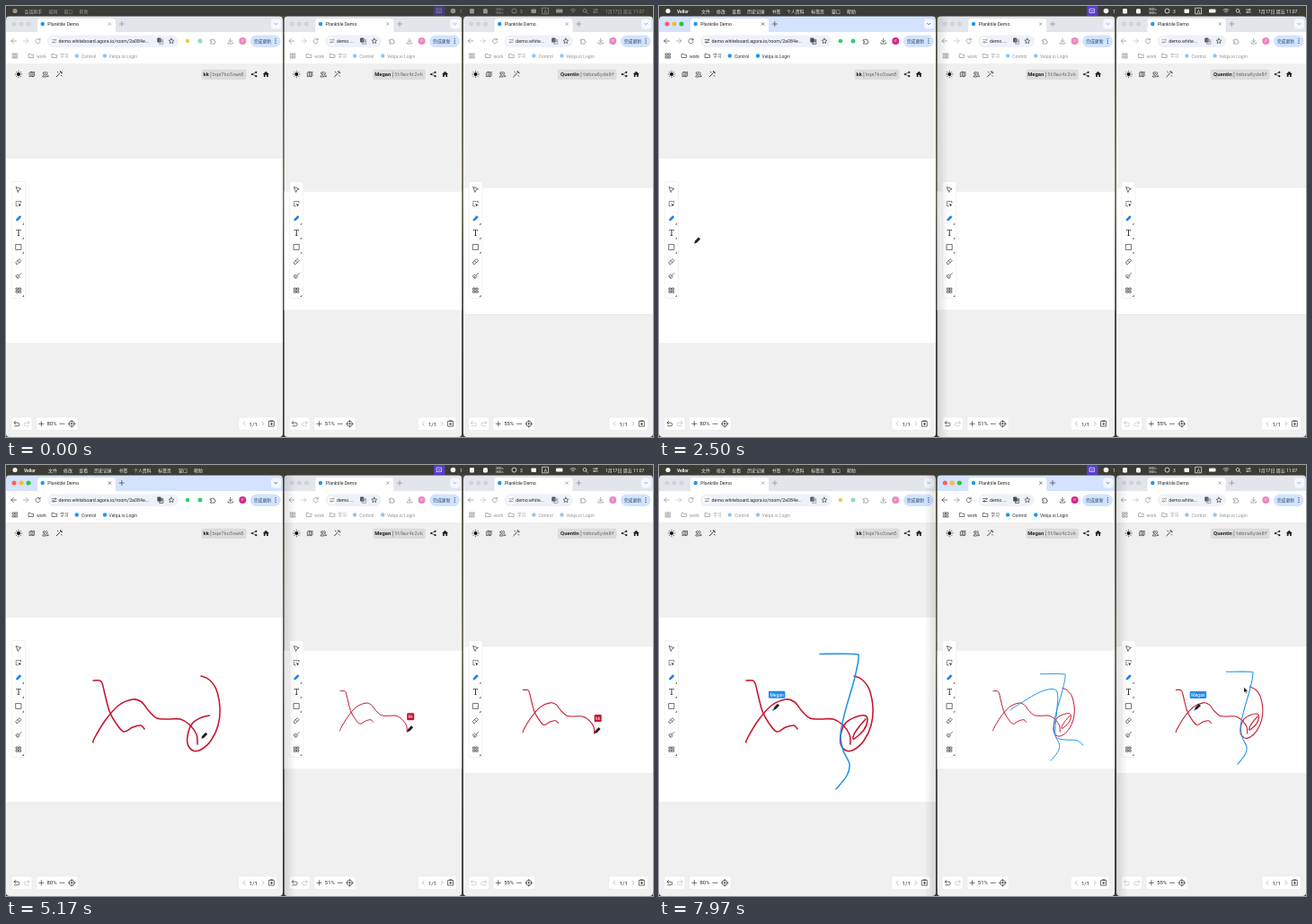
Recreate the animation shown at these times as an HTML page. Size 720 by 480 pixels, loop 8000 ms.

```html
<!DOCTYPE html>
<html lang="zh">
<head>
<meta charset="utf-8">
<title>Shared whiteboard</title>
<style>
html, body { margin: 0; width: 100%; height: 100%; overflow: hidden; background: #222; }
svg { display: block; width: 100vw; height: 100vh; }
text { font-family: Roboto, "Noto Sans CJK SC", "Noto Sans CJK", sans-serif; dominant-baseline: central; white-space: pre; }
.win { --strip: #e2e5ea; --ink: #8d8f92; --text: #929497; --mark: #8cc8f7; --ext1: #efc94c; --ext2: #8fd5d0; --face: #ec86bf; }
.win.on { --strip: #d3e3fd; --ink: #3c4043; --text: #333; --mark: #1e96f5; --ext1: #2fd05b; --ext2: #37c978; --face: #d6278c; }
.strip { fill: var(--strip); }
.bar path { stroke: var(--ink); }
.bar text { fill: var(--text); }
.bar .dark { fill: #2a2a2a; }
.icon { fill: none; stroke: #333; stroke-width: .7; stroke-linecap: round; stroke-linejoin: round; }
.solid { fill: #222; }
.panel { fill: #fff; stroke: #e4e4e6; stroke-width: .5; }
.ink { fill: none; stroke-width: 1.55; stroke-linecap: round; stroke-linejoin: round; stroke-dasharray: 1 2; }
.mono { font-family: "Noto Sans Mono", "DejaVu Sans Mono", monospace; }
.serif { font-family: "Noto Serif", "Liberation Serif", serif; }
</style>
</head>
<body>
<svg id="stage" viewBox="0 0 720 480" preserveAspectRatio="none"></svg>
<script>
const LOOP = 8000, INK_DELAY = 100, REMOTE_DELAY = 740, FOCUS = [2300, 6100];
const RED = '#c5142d', BLUE = '#1f93ea', SHADE = 14;
const stage = document.getElementById('stage');

const text = (x, y, s, size = 5, attrs = '') => `<text x="${x}" y="${y}" font-size="${size}" ${attrs}>${s}</text>`;
const icon = (x, y, d, attrs = '') => `<path class="icon" transform="translate(${x} ${y})" d="${d}" ${attrs}/>`;
const solid = (x, y, d, attrs = '') => `<path class="solid" transform="translate(${x} ${y})" d="${d}" ${attrs}/>`;
const dot = (x, y, r, fill, attrs = '') => `<circle cx="${x}" cy="${y}" r="${r}" fill="${fill}" ${attrs}/>`;
const box = (x, y, w, h, r, attrs) => `<rect x="${x}" y="${y}" width="${w}" height="${h}" rx="${r}" ${attrs}/>`;

const SHAPES = {
  back: 'M2.8 0H-2.8M-.2-2.6L-2.8 0L-.2 2.6',
  next: 'M-2.8 0H2.8M.2-2.6L2.8 0L.2 2.6',
  reload: 'M2-1.7A2.6 2.6 0 1 0 2.6.6M2.5-2.9V-1.2H.8',
  tune: 'M-2.5-1.4H0M-2.5 1.4H-1.7M.2 1.4H2.5M2.4-1.4A.9.9 0 1 0 .6-1.4A.9.9 0 1 0 2.4-1.4M.2 1.4A.9.9 0 1 0-1.7 1.4A.9.9 0 1 0 .2 1.4',
  star: 'M0-2.9L.9-1 2.9-.8 1.4.5 1.8 2.6 0 1.5-1.8 2.6-1.4.5-2.9-.8-.9-1Z',
  puzzle: 'M-2.5-1.6H-.9A.9.9 0 1 1 .9-1.6H2V0A.9.9 0 1 1 2 1.7V2.8H-2.5V1.7A1 1 0 1 0-2.5-.2Z',
  download: 'M0-3V1M-1.9-.8L0 1.1 1.9-.8M-2.7 1.4V2.8H2.7V1.4',
  apps: 'M-2.6-2.6H-.6V-.6H-2.6ZM.6-2.6H2.6V-.6H.6ZM-2.6.6H-.6V2.6H-2.6ZM.6.6H2.6V2.6H.6Z',
  folder: 'M-2.6-2H-.6L.2-1.2H2.6V2H-2.6Z',
  map: 'M-2.6-2L-.9-2.7.9-2 2.6-2.7V2L.9 2.7-.9 2-2.6 2.7ZM-.9-2.7V2M.9-2V2.7',
  sun: 'M0-3.8V-2.9M0 2.9V3.8M-3.8 0H-2.9M2.9 0H3.8M-2.7-2.7L-2.1-2.1M2.1 2.1L2.7 2.7M-2.7 2.7L-2.1 2.1M2.1-2.1L2.7-2.7',
  people: 'M-3.2 2.6C-3.2.2.4.2.4 2.6ZM1 .7C2.4.5 3.2 1.3 3.2 2.6H1.4M-2.7-1.2A1.3 1.3 0 1 0-.1-1.2A1.3 1.3 0 1 0-2.7-1.2M.8-2.4A1.2 1.2 0 1 1 1.2 0',
  wand: 'M-2.8 2.8L1-1M1.6-3.4V-2.4M2.6-1.4H3.6M-1.8-2.8L-1-2M2.4-2.4L3-3M2.4 1.4L3 2',
  share: 'M2.3-2.2L-2.2 0 2.3 2.2',
  home: 'M-3.5 0L0-3.3 3.5 0H2.5V3H.8V.8H-.8V3H-2.5V0Z',
  pointer: 'M-2.6-2.6L2.8-.7.6.4-.5 2.8Z',
  select: 'M-1 2.6H-2.8V-2.8H2.6V-1',
  pencil: 'M-3 3.2L-2.5.9 1.2-3.1 3.2-1.3-.6 2.6Z',
  square: 'M-2.9-2.9H2.9V2.9H-2.9Z',
  eraser: 'M-2.9.9L.9-2.9 2.9-.9-.9 2.9H-2ZM-1.1-.9L.9 1.1',
  broom: 'M3-3.1L.5-.6M-.8-1.2L1.1.7-.7 3-3 .4ZM-1.7 1.9L-.9.7',
  undo: 'M-1.3-2.8L-3-1.2-1.3.4M-3-1.2H1A1.8 1.8 0 0 1 1 2.5H-2.4',
  redo: 'M1.3-2.8L3-1.2 1.3.4M3-1.2H-1A1.8 1.8 0 0 0-1 2.5H2.4',
  plus: 'M-2.6 0H2.6M0-2.6V2.6',
  minus: 'M-2.6 0H2.6',
  target: 'M3 0A3 3 0 1 0-3 0A3 3 0 1 0 3 0M0-3.8V-2M0 2V3.8M-3.8 0H-2M2 0H3.8',
  left: 'M1-2L-1 0 1 2',
  right: 'M-1-2L1 0-1 2',
  addPage: 'M-2.8-2.8H2.8V2.8H-2.8ZM0-1.2V1.4M-1.2 .2H1.2M-1.4-3.5H1.4',
  close: 'M-1.3-1.3L1.3 1.3M1.3-1.3L-1.3 1.3',
  chevron: 'M-1.6-.8L0 .8 1.6-.8',
};

// Boards are described in the first window's coordinates and scaled into the others.
const BOARD_TOP = 169.5, BOARD_H = 206, WINDOW_TOP = 11.2;
const WINDOWS = [
  { x: 0, right: 308, off: 0, scale: 1, top: 169.5, name: 'kk', id: 'bqe7ko3xwm5', label: 90.5, url: 'demo.whiteboard.agora.io/room/2a084e...', star: 124, zoom: '80%' },
  { x: 309.5, right: 507.3, off: 309.3, scale: .641, top: 206.5, name: 'Megan', id: '5t9wz4r2vk', label: 98.8, url: 'demo....', star: 97.5, zoom: '51%' },
  { x: 509, right: 720, off: 508.6, scale: .684, top: 202.3, name: 'Quentin', id: 'tmbrw6yde8f', label: 106, url: 'demo.white...', star: 97, zoom: '55%' },
];
const boardX = w => w.off + .4 * (w.off > 0);
const toWindow = (w, p) => ({ x: boardX(w) + w.scale * p.x, y: w.top + w.scale * (p.y - BOARD_TOP) });

const STROKES = [
  { owner: 0, start: 3200, dur: 600, pts: [97,240, 104,240, 107,243, 110,255, 115,274, 122,287, 131,297, 141,292, 150,290, 154,294] },
  { owner: 0, start: 3950, dur: 480, pts: [97,309, 98,305, 110,285, 125,268, 141,261, 151,264, 159,274, 168,282, 180,283, 194,283, 204,289, 212,300, 213,311] },
  { owner: 0, start: 4610, dur: 640, pts: [217,235, 226,239, 234,250, 238,270, 236,290, 228,307, 217,317, 208,318, 202,310, 203,297, 208,287, 218,281, 229,279, 232,284, 228,295, 217,305, 217,300, 223,291, 230,283] },
  { owner: 1, start: 6495, dur: 500, pts: [179,210.5, 217,210.5, 222,215, 217,240, 207,275, 202,300, 205,318, 212,333, 209,346, 197,361] },
  { owner: 1, start: 7230, dur: 420, pts: [126.7,273, 148,259, 180,241, 203,237, 209,247, 208,269, 205,300, 205,317, 211,323, 226,325, 243,326, 253,334] },
];

function smoothPath(flat) {
  const p = [];
  for (let i = 0; i < flat.length; i += 2) p.push([flat[i], flat[i + 1]]);
  const at = i => p[Math.max(0, Math.min(p.length - 1, i))];
  let d = `M${p[0]}`;
  for (let i = 0; i < p.length - 1; i++) {
    const [a, b, c, e] = [at(i - 1), at(i), at(i + 1), at(i + 2)];
    const c1 = b.map((v, k) => v + (c[k] - a[k]) / 6), c2 = c.map((v, k) => v - (e[k] - b[k]) / 6);
    d += `C${c1} ${c2} ${c}`;
  }
  return d;
}

function browserBar(w, i) {
  const { off: o, right: r } = w, pill = r - w.star + 8;
  let s = box(w.x, WINDOW_TOP, r - w.x, 22, 4, 'class="strip"') + box(w.x, 29, r - w.x, 35, 0, 'fill="#fff"');
  s += box(o + 35, 14, 87, 18, 3.5, 'fill="#fff"');
  ['#ff5f57', '#febc2e', '#28c840'].forEach((c, k) => {
    s += dot(o + 9 + k * 8, 20, 2.5, '#d2d3d6') + dot(o + 9 + k * 8, 20, 2.5, c, 'data-light');
  });
  s += dot(o + 40.7, 20, 2.2, '#1e96f5') + text(o + 46.3, 20, 'Planktile Demo', 5.2, 'class="dark"');
  s += icon(o + 115.5, 20, SHAPES.close) + icon(o + 128.8, 20, SHAPES.plus, 'stroke-width=".6"');
  s += box(r - 13, 14.5, 11, 11, 3, 'fill="#f3f7ff"') + icon(r - 7.8, 20, SHAPES.chevron);
  s += icon(o + 8.5, 39, SHAPES.back) + icon(o + 22, 39, SHAPES.next, 'opacity=".55"') + icon(o + 35.5, 39, SHAPES.reload);
  s += box(o + 46, 32.5, pill - o - 46, 13.5, 6.7, 'fill="#edf1fa"');
  s += dot(o + 53.5, 39, 4.6, '#fff') + icon(o + 53.5, 39, SHAPES.tune) + text(o + 58.6, 39.2, w.url, 5.3, 'class="dark"');
  const tr = r - w.star - 12.5;
  s += box(tr - 3.2, 35.5, 4.2, 5, .5, 'fill="#555"') + icon(tr + 1, 39.8, 'M-1.4-2.4H2.3V2.6H-1.4ZM-.6-.8H1.5M.4-1.4V-.8M-.4 1.4L1.3-.6');
  s += icon(r - w.star, 39, SHAPES.star, 'style="stroke:#444"');
  if (!i) s += dot(202, 39, 2.3, 'var(--ext1)') + dot(216, 39, 2.5, 'var(--ext2)');
  s += icon(r - 78, 39.3, SHAPES.puzzle) + icon(r - 58.3, 39.2, SHAPES.download);
  s += dot(r - 44.7, 39, 4, 'var(--face)') + text(r - 44.7, 39, 'LY', 2.8, 'text-anchor="middle" style="fill:#fff"');
  s += box(r - 36, 32.5, 33.5, 13.5, 6.7, 'fill="#d3e3fd"') + text(r - 32.3, 39, '完成更新', 4.9, 'style="fill:#24446f"');
  s += [-2.4, 0, 2.4].map(dy => dot(r - 8, 39 + dy, .65, '#24446f')).join('');
  s += icon(o + 10, 55.5, SHAPES.apps) + icon(o + 28, 55.5, SHAPES.folder) + text(o + 34, 55.6, 'work');
  s += icon(o + 54, 55.5, SHAPES.folder) + text(o + 60.3, 55.6, '学习', 4.6);
  s += dot(o + 78.8, 55.5, 2.2, 'var(--mark)') + text(o + 84, 55.6, 'Control');
  s += dot(o + 110, 55.5, 2.2, 'var(--mark)') + text(o + 114.6, 55.6, 'Velqa.io Login');
  return `<g class="bar">${s}</g>`;
}

function page(w) {
  const { off: o, right: r } = w, h = BOARD_H * w.scale, width = r - w.x;
  let s = box(w.x, 63.5, width, 417, 0, 'fill="#f0f0f0"');
  s += box(w.x, w.top - .5, width, h + 1, 0, 'fill="#e6e6e6"') + box(w.x, w.top, width, h, 0, 'fill="#fff"');
  s += `<g transform="translate(${boardX(w)} ${w.top - BOARD_TOP * w.scale}) scale(${w.scale})">` + STROKES.map(k =>
    `<path class="ink" pathLength="1" stroke="${k.owner ? BLUE : RED}" d="${smoothPath(k.pts)}"/>`).join('') + '</g>';

  s += dot(o + 14, 76, 2, '#111') + icon(o + 14, 76, SHAPES.sun) + icon(o + 29, 76, SHAPES.map);
  s += icon(o + 44, 76, SHAPES.people) + icon(o + 59, 76, SHAPES.wand, 'style="stroke-width:.95"');
  const idWidth = w.id.length * 3.2, idX = r - 43 - idWidth;
  s += box(r - w.label, 70.8, w.label - 40.5, 11.2, 2, 'fill="#dcdcdd"');
  s += text(idX - 4, 76.4, w.name, 5.9, 'font-weight="700" text-anchor="end" fill="#222"');
  s += icon(idX - 1.9, 76.4, 'M0-2.8V2.8', 'style="stroke-width:.4"');
  s += text(idX, 76.4, w.id, 5.3, 'class="mono" fill="#666"');
  s += icon(r - 32, 76, SHAPES.share) + [[2.3, -2.2], [-2.2, 0], [2.3, 2.2]].map(([x, y]) => dot(r - 32 + x, 76 + y, 1.1, '#222')).join('');
  s += solid(r - 18.7, 76, SHAPES.home);

  const tx = o + 14, ty = k => 204.3 + 16.05 * k;
  s += box(o + 6.3, 195.5, 15.2, 130, 1.8, 'class="panel"');
  s += icon(tx, ty(0), SHAPES.pointer) + icon(tx, ty(1), SHAPES.select, 'stroke-dasharray="1 1.3"') + solid(tx + 1, ty(1) + 1, 'M-1.2-1.2L2.2.1.6.7 0 2.2Z');
  s += solid(tx, ty(2), SHAPES.pencil, 'style="fill:#1f80ee"') + text(tx, ty(3), 'T', 9, 'class="serif" text-anchor="middle" fill="#222"');
  s += icon(tx, ty(4), SHAPES.square) + icon(tx, ty(5), SHAPES.eraser) + icon(tx, ty(6), SHAPES.broom) + icon(tx, ty(7), SHAPES.apps);
  s += [2, 3, 4, 7].map(k => solid(tx + 5, ty(k) + 6.2, 'M.9-.9V.9H-.9Z')).join('');

  const y = 465.3;
  s += box(o + 6, 458, 23, 14.5, 2, 'class="panel"') + icon(o + 12, y, SHAPES.undo, o > 309 && o > 400 ? 'opacity=".3"' : '') + icon(o + 23, y, SHAPES.redo, 'opacity=".3"');
  s += box(o + 33.5, 458, 46.5, 14.5, 2, 'class="panel"') + icon(o + 39.3, y, SHAPES.plus) + text(o + 51, y, w.zoom, 5.9, 'text-anchor="middle" fill="#222"');
  s += icon(o + 62.5, y, SHAPES.minus) + icon(o + 73.2, y, SHAPES.target) + dot(o + 73.2, y, 1, '#333');
  s += box(r - 49, 458, 43, 14.5, 2, 'class="panel"') + icon(r - 43, y, SHAPES.left, 'opacity=".45"') + text(r - 32.8, y, '1/1', 6, 'text-anchor="middle" fill="#222"');
  return s + icon(r - 22, y, SHAPES.right, 'opacity=".45"') + icon(r - 12.5, y, SHAPES.addPage);
}

function menuBar() {
  const items = list => list.map(([x, s], i) => text(x, 5.5, s, 4.9, i ? '' : 'font-weight="700"')).join('');
  const idle = items([[20.5, '会话助手'], [47.5, '编辑'], [64.5, '窗口'], [81.5, '帮助']]);
  const busy = items([[20, 'Vellor'], [47, '文件'], [64, '修改'], [81.3, '查看'], [98.2, '历史记录'], [125.6, '书签'], [142, '个人资料'], [169.3, '标签页'], [192, '窗口'], [209, '帮助']]);
  const line = 'style="stroke:#fff"';
  const status = box(476, 0, 12.5, 11, 1.5, 'fill="#5a3fd0"') + icon(482, 5.5, 'M-2.6-2.4H2.6V2H-2.6ZM-1 0H1', line)
    + dot(497.5, 5.5, 2.8, '#fff') + text(505, 5.5, '1') + box(516, 3, 5, 5.5, 1, '') + box(531, 3, 5, 5.5, 1.6, '')
    + text(545, 3.7, '0KB/s', 3.2) + text(545, 7.5, '0KB/s', 3.2) + dot(565.5, 5.5, 2.5, 'none', 'stroke="#fff" stroke-width=".8"') + text(572, 5.5, '3')
    + box(584.5, 3.4, 5.5, 4.5, .8, '') + icon(600.3, 5.5, 'M-3.3-3.3H3.3V3.3H-3.3Z', line) + text(600.3, 5.6, 'A', 5, 'text-anchor="middle"')
    + box(612, 3.5, 7.5, 4, 1, '') + icon(631, 5.5, 'M-3-1A4.3 4.3 0 0 1 3-1M-1.7.5A2.4 2.4 0 0 1 1.7.5M0 2V2.1', line)
    + icon(644.5, 5.3, 'M1.5 0A1.9 1.9 0 1 0-2.3 0A1.9 1.9 0 1 0 1.5 0M1 1.4L2.7 3', line)
    + icon(656, 5.5, 'M-2.5-1.4H2.5M-2.5 1.4H2.5M1-2.2V-.6M-1 .6V2.2', line) + text(667, 5.5, '1月17日 周五 11:07', 5);
  return box(0, 0, 720, WINDOW_TOP, 0, 'fill="#3b3c35"')
    + `<g id="menu" fill="#fff">${dot(10, 5.5, 2.6, '#fff')}<g id="idle">${idle}</g><g id="busy">${busy}</g>${status}</g>`;
}

const PEN = 'M0 0L.8-2.8 4.8-7 7-5 2.9-.8Z';
const remotePen = (i, owner) => {
  const name = WINDOWS[owner].name, w = owner ? 18.5 : 8;
  return `<g data-remote="${i},${owner}">${solid(0, 0, PEN)}${box(4 - w / 2, -21, w, 8, 1.2, `fill="${owner ? '#258ce8' : RED}"`)}`
    + text(4, -17, name, 5, 'text-anchor="middle" fill="#fff"') + '</g>';
};

const gradient = (id, axis, stops) => `<linearGradient id="${id}" ${axis}>${stops.map(([at, color, alpha = 1]) =>
  `<stop offset="${at}" stop-color="${color}" stop-opacity="${alpha}"/>`).join('')}</linearGradient>`;

stage.innerHTML = '<defs>'
  + gradient('desk', 'x2="0" y2="1"', [[0, '#4a4b3f'], [.4, '#75705f'], [.6, '#45483f'], [1, '#3a3d38']])
  + gradient('shadeLeft', '', [[0, '#000', 0], [1, '#000', .13]]) + gradient('shadeRight', '', [[0, '#000', .13], [1, '#000', 0]]) + '</defs>'
  + box(0, 0, 720, 480, 0, 'fill="url(#desk)"')
  + WINDOWS.map((w, i) => `<clipPath id="clip${i}">${box(w.x, WINDOW_TOP, w.right - w.x, 480 - WINDOW_TOP, 4, '')}</clipPath><g class="win" clip-path="url(#clip${i})">${page(w)}${browserBar(w, i)}</g>`).join('')
  + ['Left', 'Right'].map(side => box(0, WINDOW_TOP, SHADE, 480, 0, `id="side${side}" fill="url(#shade${side})"`)).join('')
  + menuBar() + [[1, 0], [2, 0], [0, 1], [2, 1]].map(a => remotePen(...a)).join('')
  + `<g id="mouse">${solid(0, 0, PEN)}<path d="M0 0V6L1.4 4.8 2.4 6.9 3.3 6.5 2.4 4.5H4.3Z" fill="#000" stroke="#fff" stroke-width=".4"/></g>`;

const $ = id => document.getElementById(id);
const wins = [...stage.querySelectorAll('.win')].map(el => ({ el, inks: [...el.querySelectorAll('.ink')], lights: el.querySelectorAll('[data-light]') }));
const remotes = [...stage.querySelectorAll('[data-remote]')].map(el => ({ el, ids: el.dataset.remote.split(',').map(Number) }));
const mouse = $('mouse'), [mousePen, mouseArrow] = mouse.children;
STROKES.forEach((s, i) => { s.path = wins[0].inks[i]; s.length = s.path.getTotalLength(); });

const clamp = v => Math.max(0, Math.min(1, v));
const show = (el, on) => { el.style.display = on ? '' : 'none'; };
const progress = (s, t) => clamp((t - s.start) / s.dur);
const pointOn = (s, p) => s.path.getPointAtLength(s.length * p);
const place = (el, p) => el.setAttribute('transform', `translate(${p.x.toFixed(2)} ${p.y.toFixed(2)})`);

function along(keys, t) {
  const k = keys.findIndex(key => key.t > t);
  if (k <= 0) return k ? keys[keys.length - 1] : keys[0];
  const a = keys[k - 1], b = keys[k], u = (t - a.t) / (b.t - a.t), e = u * u * (3 - 2 * u);
  return { x: a.x + (b.x - a.x) * e, y: a.y + (b.y - a.y) * e };
}
const strokeKeys = (list, map) => list.flatMap(s => [0, 1].map(p => ({ t: s.start + p * s.dur, ...map(s, pointOn(s, p)) })));

const MOUSE_IN = 1000;
const mouseKeys = [[MOUSE_IN, 8, 345], [1600, 18.5, 253], [2000, 18.5, 253], [2300, 24, 259], [2750, 60, 272], [5850, 444, 247], [6100, 430, 237], [7970, 651, 247.5]]
  .map(([t, x, y]) => ({ t, x, y }))
  .concat(strokeKeys(STROKES, (s, p) => toWindow(WINDOWS[s.owner], p)))
  .sort((a, b) => a.t - b.t);
const penKeys = [0, 1].map(owner => strokeKeys(STROKES.filter(s => s.owner === owner), (s, p) => ({ x: p.x, y: p.y })));
const drawing = (t, owner) => STROKES.find(s => t >= s.start && t < s.start + s.dur && (owner === undefined || s.owner === owner));

function render(t) {
  const focus = t < FOCUS[0] ? -1 : t < FOCUS[1] ? 0 : 1, w = WINDOWS[focus];
  $('menu').setAttribute('opacity', w ? .95 : .45);
  show($('idle'), !w);
  show($('busy'), w);
  show($('sideLeft'), w);
  show($('sideRight'), w);
  if (w) {
    $('sideLeft').setAttribute('x', w.x - SHADE);
    $('sideRight').setAttribute('x', w.right);
  }

  wins.forEach(({ el, inks, lights }, i) => {
    el.classList.toggle('on', i === focus);
    lights.forEach(l => show(l, i === focus));
    inks.forEach((ink, k) => {
      const s = STROKES[k], p = progress(s, t - (s.owner === i ? INK_DELAY : REMOTE_DELAY));
      show(ink, p > 0);
      ink.style.strokeDashoffset = 1 - p;
    });
  });

  const active = drawing(t);
  const m = active ? toWindow(WINDOWS[active.owner], pointOn(active, progress(active, t))) : along(mouseKeys, t);
  const onBoard = w && m.x > w.x + 24 && m.x < w.right && m.y > w.top && m.y < w.top + BOARD_H * w.scale;
  show(mouse, t >= MOUSE_IN);
  show(mousePen, onBoard);
  show(mouseArrow, !onBoard);
  place(mouse, m);

  remotes.forEach(({ el, ids: [i, owner] }) => {
    const keys = penKeys[owner], rt = t - REMOTE_DELAY, s = drawing(rt, owner);
    show(el, rt >= keys[0].t && rt < keys[keys.length - 1].t + 300);
    place(el, toWindow(WINDOWS[i], s ? pointOn(s, progress(s, rt)) : along(keys, rt)));
  });
}

const began = performance.now();
(function tick() {
  render((performance.now() - began) % LOOP);
  requestAnimationFrame(tick);
})();
</script>
</body>
</html>
```
